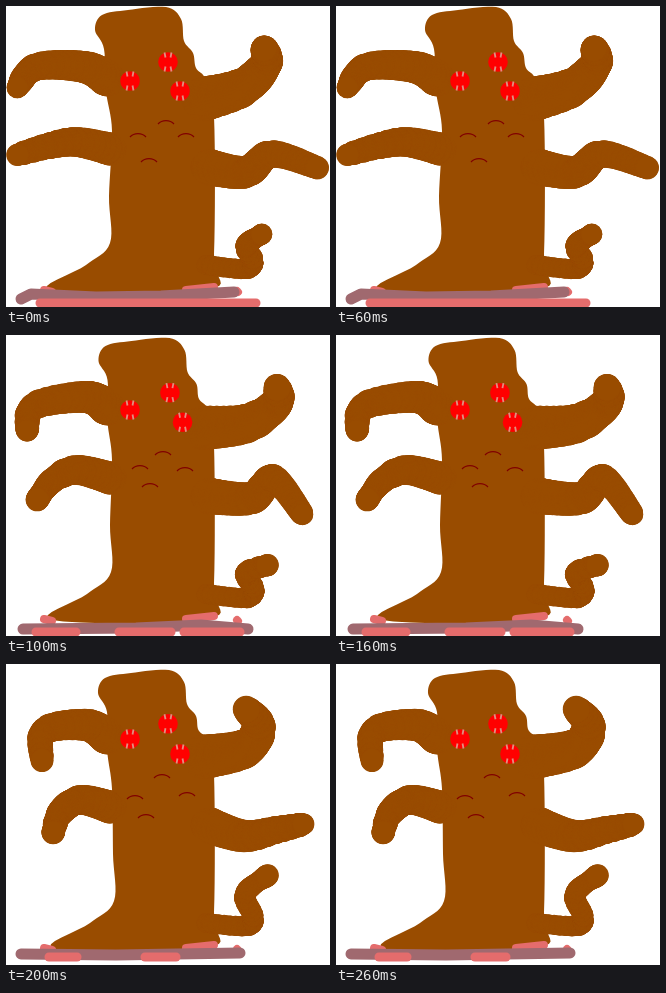
Animation of 324 by 301 pixels, one loop 300 ms. Source, as an HTML page with a canvas:

```html
<!DOCTYPE html>
<html lang="en">
<head>
<meta charset="utf-8">
<title>Waving tree</title>
<style>
  html, body { margin: 0; width: 100%; height: 100%; overflow: hidden; background: #fff; }
  canvas { display: block; }
</style>
</head>
<body>
<canvas id="stage" width="324" height="301"></canvas>
<script>
const ctx = document.getElementById('stage').getContext('2d');
const BROWN = '#994c00', PINK = '#e46c6c', MAUVE = '#a0696f';
const STEP = 100;

// key points are written "x y, x y"
const TRUNK = '89 24, 96 9, 122 4, 160 1, 175 13, 178 35, 187 47, 190 62, 200 74, 208 110, 208 248, 201 284, 45 285, 80 259, 104 237, 103 190, 106 125, 100 85, 98 43';
const EYES = '124 75, 162 56, 174 85';

// each limb tapers from its root; one bend per pose
const limbs = [
  { root: '102 73', taper: [18, 11], bends: ['78 61, 30 61, 11 82', '80 62, 28 71, 21 96', '80 61, 38 67, 36 97'] },
  { root: '104 143', taper: [16, 11], bends: ['70 136, 42 140, 11 149', '70 135, 46 146, 31 165', '74 136, 54 149, 47 169'] },
  { root: '198 93', taper: [22, 13], bends: ['237 81, 260 58, 258 42', '242 88, 271 68, 271 52', '240 84, 253 62, 240 45'] },
  { root: '202 161', taper: [18, 11], bends: ['240 166, 266 148, 312 162', '246 163, 267 143, 297 180', '238 172, 270 166, 298 160'] },
  { root: '200 259', taper: [9.5, 10.5], bends: ['240 263, 247 254, 240 240, 256 228', '241 263, 248 254, 240 238, 262 230', '241 262, 247 252, 239 230, 262 211'] }
];

const poses = [
  { head: [0, 0], gaze: [0, 0], lean: 0, mouths: '132 130, 160 117, 180 130, 143 155',
    soil: '15 293, 25 288, 90 291, 155 290, 228 286', patches: '34 250', patchY: 297 },
  { head: [3.5, 2], gaze: [2.3, 2], lean: 1, mouths: '134 133, 157 119, 179 135, 144 151',
    soil: '17 294, 130 293, 195 290, 242 294', patches: '30 70, 113 165, 178 234', patchY: 297 },
  { head: [3, 5], gaze: [0, 4.5], lean: 4, mouths: '129 134, 156 113, 181 131, 140 153',
    soil: '15 290, 110 291, 234 289', patches: '43 71, 139 170', patchY: 293 }
];

const parse = text => text.split(', ').map(p => p.split(' ').map(Number));
const clamp = v => Math.min(1, Math.max(0, v));

const spline = (a, b, c, d, t) => b.map((v, i) =>
  v + t / 2 * (c[i] - a[i] + t * (2 * a[i] - 5 * v + 4 * c[i] - d[i] + t * (3 * (v - c[i]) + d[i] - a[i]))));

function disc(x, y, r) {
  ctx.beginPath();
  ctx.arc(x, y, r, 0, 7);
  ctx.fill();
}

function stroke(color, width, points) {
  ctx.strokeStyle = color;
  ctx.lineWidth = width;
  ctx.beginPath();
  for (const p of points) ctx.lineTo(...p);
  ctx.stroke();
}

function drawTrunk({ head, lean }) {
  const p = parse(TRUNK).map(([x, y]) => {
    const sway = clamp((110 - y) / 60);
    const waist = x < 110 && y > 150 ? lean : 0;
    return [x + head[0] * sway + waist, y + head[1] * sway];
  });
  const n = p.length;
  ctx.beginPath();
  for (let i = 0; i < n; i++)
    for (let t = 0; t < 1; t += 0.125)
      ctx.lineTo(...spline(p[(i + n - 1) % n], p[i], p[(i + 1) % n], p[(i + 2) % n], t));
  ctx.fill();
}

function drawLimb({ root, taper: [thick, thin], bends }, k) {
  const p = parse(root + ', ' + bends[k]), last = p.length - 1;
  for (let s = 0; s <= last; s += 0.02) {
    const i = Math.min(Math.floor(s), last - 1);
    const [x, y] = spline(p[Math.max(i - 1, 0)], p[i], p[i + 1], p[Math.min(i + 2, last)], s - i);
    const rough = 0.5 * Math.sin(x + y); // uneven brush edge
    disc(x, y, thick + (thin - thick) * s / last + rough);
  }
}

function drawEye(x, y) {
  ctx.fillStyle = '#f00';
  disc(x, y, 9.8);
  for (const sx of [-1, 1])
    for (const sy of [-1, 1])
      stroke('#e09080', 1.8, [[x + sx * 3.5, y + sy * 9.5], [x + sx * 2.5, y + sy * 4.5]]);
}

function drawMouth([x, y]) {
  ctx.strokeStyle = '#800000';
  ctx.lineWidth = 1.2;
  ctx.beginPath();
  ctx.moveTo(x - 8, y + 1);
  ctx.bezierCurveTo(x - 4, y - 3.5, x + 4, y - 3.5, x + 8, y + 1);
  ctx.stroke();
}

function drawGround({ soil, patches, patchY }) {
  for (const rim of ['38 284, 46 286', '180 284, 208 281', '231 285, 232 286'])
    stroke(PINK, 8, parse(rim));
  stroke(MAUVE, 11, parse(soil));
  for (const [x1, x2] of parse(patches))
    stroke(PINK, 9, [[x1, patchY], [x2, patchY]]);
}

function draw(k) {
  const pose = poses[k];
  ctx.fillStyle = '#fff';
  ctx.fillRect(0, 0, 324, 301);
  ctx.fillStyle = BROWN;
  drawTrunk(pose);
  for (const limb of limbs) drawLimb(limb, k);

  ctx.lineCap = 'butt';
  for (const [x, y] of parse(EYES)) {
    const turn = (x - 124) / 45;
    drawEye(x + pose.gaze[0] * turn, y + pose.gaze[1] * turn);
  }
  parse(pose.mouths).forEach(drawMouth);

  ctx.lineCap = ctx.lineJoin = 'round';
  drawGround(pose);
}

function tick(now) {
  draw(Math.floor(now / STEP) % poses.length);
  requestAnimationFrame(tick);
}
tick(performance.now());
</script>
</body>
</html>
```
